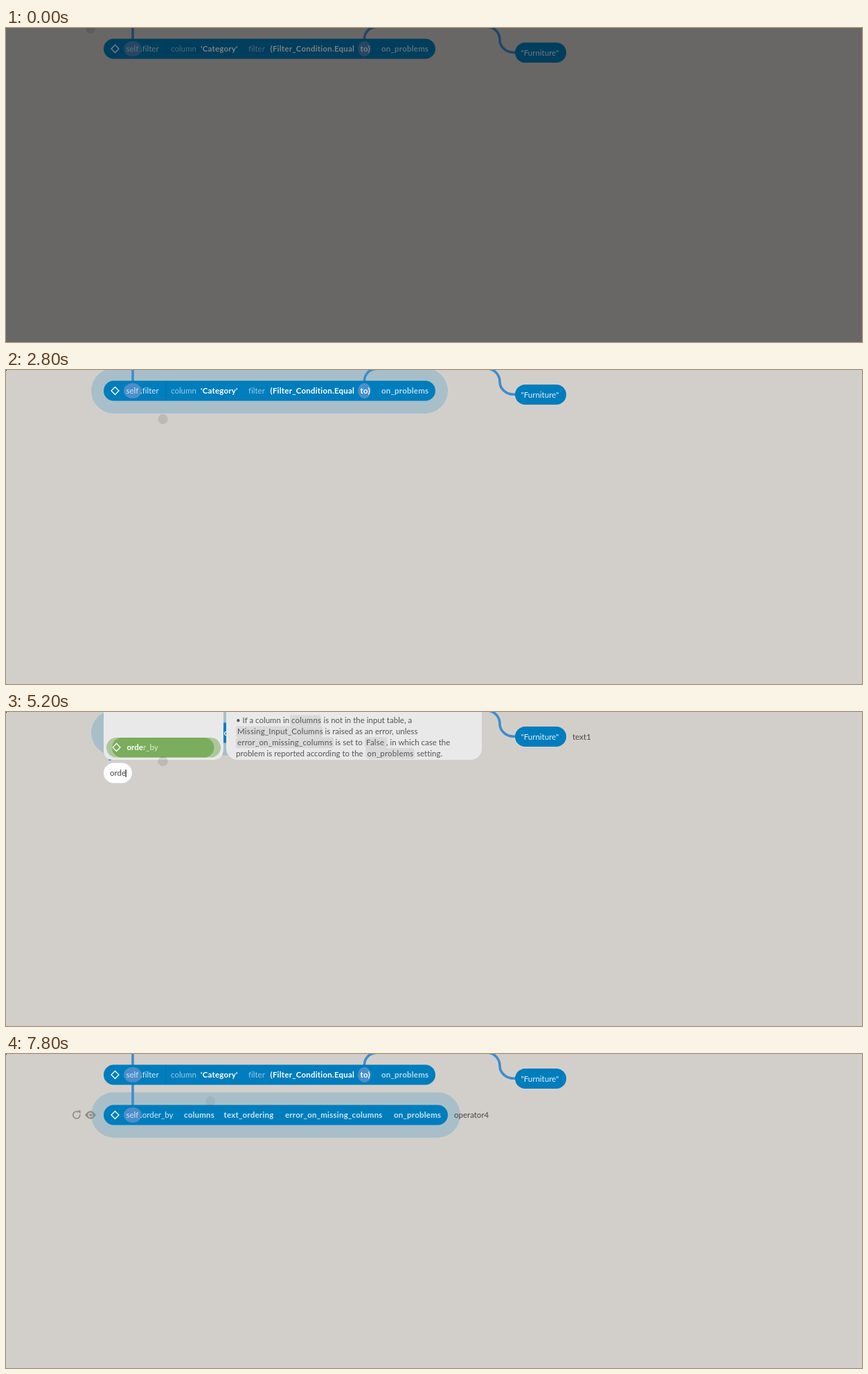
An HTML page for the animation above (8000 ms loop, 1236 px wide and 453 px high).

```html
<!DOCTYPE html>
<html lang="en">
<head>
<meta charset="utf-8">
<title>Node editor</title>
<style>
  html, body { margin: 0; width: 100%; height: 100%; overflow: hidden; background: #d2cfcb; }
  svg { display: block; width: 1236px; height: 453px; }
  text {
    font: 11.5px Lato, "Noto Sans", sans-serif;
    font-variant-ligatures: none;
    white-space: pre;
  }
  .b { font-weight: 700; letter-spacing: .22px; }
  .code { letter-spacing: .2px; }
  .edge { fill: none; stroke: #418ccb; stroke-width: 3.6; }
</style>
</head>
<body>
<svg id="stage" viewBox="0 0 1236 453"></svg>
<script>
const stage = document.getElementById("stage");
const LOOP = 8000, STEP = 200;
const BLUE = "#007dbd", PURPLE = "#b066c5", GREEN = "#7aad5c", INK = "#474645", PANEL = "#e9e9ea";

const rect = (x, y, w, h, r, fill, extra = "") =>
  `<rect x="${x}" y="${y}" width="${w}" height="${h}" rx="${r}" fill="${fill}" ${extra}/>`;
const text = (x, y, s, fill = "#fff", cls = "", alpha = 1) =>
  `<text x="${x}" y="${y}" class="${cls}" fill="${fill}" fill-opacity="${alpha}">${s}</text>`;
const edge = d => `<path class="edge" d="${d}"/>`;
const diamond = (x, y, color = "#fff") =>
  `<path d="M${x - 5.5} ${y}l5.5-5.5 5.5 5.5-5.5 5.5z" fill="none" stroke="${color}" stroke-width="1.3"/>`;
const blob = (x, y, rx) => `<ellipse cx="${x}" cy="${y}" rx="${rx}" ry="11" fill="#4a8fca"/>`;
const group = (id, body) => `<g id="${id}">${body}</g>`;

const pill = (y, w) => rect(141, y - 14.5, w, 29, 14.5, BLUE);
const halo = (y, w) => rect(123, y - 32.7, w, 65.4, 32.7, BLUE, 'opacity=".2"');
const selfCall = (y, name) =>
  diamond(157.5, y) + blob(183, y, 13) +
  text(173.5, y + 4, "self", "#fff", "", .75) + text(194, y + 4, "." + name, "#fff", "", .85);

function icons(y) {
  return `<g fill="none" stroke="#8f8d8b" stroke-width="1.7">
    <path d="M104.5 ${y - 4.2}A5 5 0 1 0 106.8 ${y - .5}"/></g>
    <path d="M103 ${y - 6.5}h4.5v5z" fill="#8f8d8b"/>
    <path fill-rule="evenodd" fill="#8f8d8b" d="M114 ${y}q8-11.5 16 0q-8 11.5-16 0z
      M118.4 ${y}a3.6 3.6 0 1 0 7.2 0a3.6 3.6 0 1 0-7.2 0z"/>
    <circle cx="122" cy="${y}" r="1.9" fill="#8f8d8b"/>`;
}

const filterNode =
  pill(30, 479) + rect(230.5, 15.5, 1, 29, 0, "#000", 'opacity=".07"') +
  selfCall(30, "filter") +
  text(238, 34, "column", "#fff", "", .6) + text(281, 34, "'Category'", "#fff", "b") +
  text(350, 34, "filter", "#fff", "", .6) + text(381.5, 34, "(Filter_Condition.Equal", "#fff", "b") +
  blob(517.5, 30, 9.5) + text(511.5, 34, "to)", "#fff", "b") +
  text(542, 34, "on_problems", "#fff", "b", .72);

const orderNode =
  pill(88, 497) + selfCall(88, "order_by") +
  [[257, "columns"], [314.5, "text_ordering"], [403, "error_on_missing_columns"], [560, "on_problems"]]
    .map(([x, s]) => text(x, 92, s, "#fff", "b", .8)).join("");

const chip = (x, w, y, s) =>
  rect(x, y - 11.5, w, 15.5, 3, "#d9d9d9") + text(x + 2, y, s, "#555", "code");
const note = (x, y, s) => text(x, y, s, "#555");

const docText =
  note(332, 16, "• If a column in") + chip(410, 45, 16, "columns") + note(458.5, 16, "is not in the input table, a") +
  chip(332, 125, 32, "Missing_Input_Columns") + note(460.5, 32, "is raised as an error, unless") +
  chip(332, 141, 48, "error_on_missing_columns") + note(475.5, 48, "is set to") +
  chip(518, 32, 48, "False") + note(549, 48, ", in which case the") +
  note(332, 63.5, "problem is reported according to the") + chip(519.5, 70.5, 63.5, "on_problems") +
  note(593, 63.5, "setting.");

const methodList =
  diamond(159.5, 22, PURPLE) + text(174.5, 26, "column_names", "#6b6a69") +
  `<path d="M299 37H159.5a14.3 14.3 0 0 0 0 28.6H299z" fill="${PURPLE}"/>` +
  rect(299, -5, 11, 60, 0, "#f2f2f2") + rect(301, 25, 7, 38, 3.5, "#b6b6b6") +
  `<path d="M147 67.2H298q12 0 13.5-13" fill="none" stroke="#f8f8f8" stroke-width="2.5"/>` +
  diamond(159.5, 51) + text(174.5, 55, "column_count", "#fff", "", .85);

const orderRow =
  rect(145, 37, 165, 28.6, 14.3, GREEN, 'id="rowBack"') +
  rect(145, 37, 165, 28.6, 14.3, GREEN, 'id="rowFront"') + diamond(159.5, 51) +
  `<text x="174.5" y="55" fill="#fff"><tspan id="match" font-weight="700"></tspan><tspan id="rest" fill-opacity=".75"></tspan></text>`;

stage.innerHTML =
  rect(0, 0, 1236, 453, 0, "#d2cfcb") +
  group("filterHalo", halo(30, 515)) + group("orderHalo", halo(88, 533)) +
  edge("M183-2V20") + edge("M517.5 22V16A17 17 0 0 1 534.5-1.5") +
  edge("M694-2A19 19 0 0 1 713 17A20 18.3 0 0 0 733 35.3H737") +
  group("orderEdge", edge("M183 40V80")) + group("draftEdge", edge("M150 42V70")) +
  filterNode + rect(735, 21, 74, 29, 14.5, BLUE) + text(743.5, 39.5, '"Furniture"', "#fff", "", .9) +
  group("filterHover", icons(30) + text(629, 34, "operator3", INK)) +
  group("orderNode", orderNode) + group("orderHover", icons(88) + text(647, 92, "operator4", INK)) +
  group("textLabel", text(818, 39.5, "text1", INK)) +
  group("browser",
    `<path d="M141-5H314V53q0 16-16 16H155q-14 0-14-14z" fill="${PANEL}"/>` +
    rect(318, -40, 369, 109, 16, PANEL) +
    group("methods", methodList) + group("orderRow", orderRow) + group("docs", docText)) +
  group("draft",
    rect(141, 73.5, 18, 29, 9, "#fff", 'id="inputBox"') +
    `<text id="typed" x="150" y="92" fill="${INK}"></text>` +
    rect(172, 83, 1.2, 11, 0, "#222", 'id="caret"')) +
  `<circle id="pointer" r="7.2" fill="#000"/>` +
  rect(0, 0, 1, 1, 0, "#111", 'id="corner"') +
  rect(0, 0, 1236, 453, 0, "#000", 'id="dim" opacity=".5"');

const el = {};
stage.querySelectorAll("[id]").forEach(e => el[e.id] = e);

const show = (id, alpha) => {
  el[id].style.display = alpha ? "" : "none";
  el[id].style.opacity = Number(alpha);
};
const set = (id, attrs) => Object.entries(attrs).forEach(([k, v]) => el[id].setAttribute(k, v));
const ramp = (t, a, b) => Math.max(0, Math.min(1, (t - a) / (b - a)));
const ease = p => p * p * (3 - 2 * p);

// time, x, y
const pointerPath = [[1200, 122, 1], [1600, 200, 30], [2000, 200, 30], [2400, 226.5, 71], [6800, 226.5, 71], [7400, 295, 68]];
const keyTimes = [4000, 4400, 4600, 5000, 5600];

function pointerAt(t) {
  let [, x, y] = pointerPath[0];
  for (let i = 1; i < pointerPath.length; i++) {
    const [t0] = pointerPath[i - 1], [t1, x1, y1] = pointerPath[i];
    const p = ease(ramp(t, t0, t1));
    x += (x1 - x) * p;
    y += (y1 - y) * p;
  }
  return { cx: x, cy: y };
}

function draw(t) {
  const open = ramp(t, 2800, 3200) * (1 - ramp(t, 6600, 7000));
  const done = t >= 7000;
  const word = "order".slice(0, keyTimes.filter(k => t >= k).length);

  el.dim.style.display = t < STEP ? "" : "none";
  show("corner", t >= 2800);
  set("pointer", pointerAt(t));
  el.pointer.style.opacity = t >= 7200 ? .05 : .1;

  show("filterHalo", ramp(t, 1600, 2000) * !done);
  show("filterHover", t >= 1400 && t < 2200);
  show("textLabel", open);
  show("browser", open);
  show("draft", open);
  show("draftEdge", open);
  show("methods", t < 4600);
  show("orderRow", t >= 4600);
  show("docs", t >= 5200);

  // The highlight settles into the remaining row.
  const inset = t >= 5400 ? 0 : t >= 5200 ? 8 : 16;
  set("rowFront", { x: 145 + inset, width: 165 - inset * 2.2 });
  el.rowBack.style.opacity = .55;
  el.match.textContent = word;
  el.rest.textContent = "order_by".slice(word.length);

  el.typed.textContent = word;
  const w = word ? el.typed.getComputedTextLength() : 0;
  set("inputBox", { width: 18 + w, rx: Math.min(14.5, 9 + w / 2) });
  set("caret", { x: 149.5 + w });
  show("caret", word !== "");

  show("orderHalo", ramp(t, 6800, 7200));
  show("orderEdge", done);
  show("orderNode", done);
  show("orderHover", t >= 7200);
}

const start = performance.now();
let last = -1;
function tick() {
  const t = Math.floor((performance.now() - start) % LOOP / STEP) * STEP;
  if (t !== last) draw(last = t);
  requestAnimationFrame(tick);
}
tick();
</script>
</body>
</html>
```
